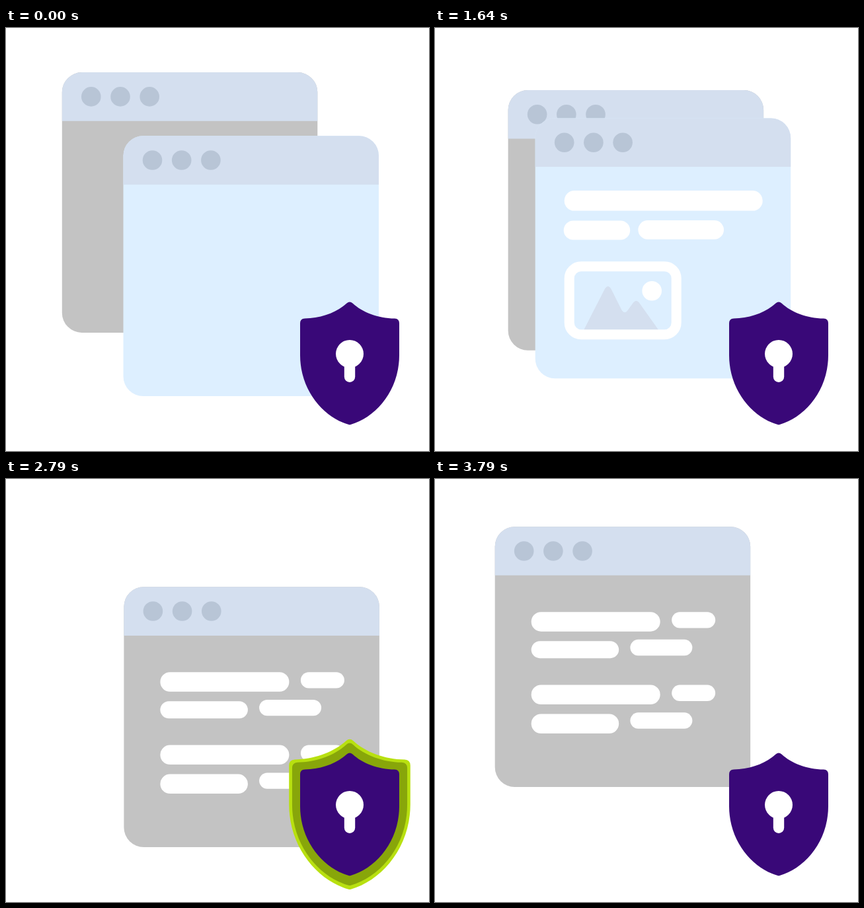
An HTML page without scripts for the animation above (3.87 s loop, 640 by 640 pixels).

```html
<!DOCTYPE html>
<html lang="en">
<head>
<meta charset="utf-8">
<title>Protected windows</title>
<style>
/* --t: milliseconds elapsed in the current half of the loop */
@property --t { syntax: '<number>'; inherits: true; initial-value: 0; }
@keyframes clock { to { --t: 1935; } }
@keyframes scene { from { visibility: visible; } 50%, to { visibility: hidden; } }

html, body { margin: 0; width: 100%; height: 100%; overflow: hidden; background: #fff; }
svg { display: block; width: 100vw; height: 100vh; animation: clock 1935ms linear -5ms infinite; }

.scene { animation: scene 3870ms step-end -5ms infinite; }
.second { animation-delay: -1940ms; }

.win {
  --p: clamp(0, (var(--t) - 1500) / 420, 1);
  --m: calc(var(--p) * var(--p) * (3 - 2 * var(--p)) * var(--dir));
  transform: translate(calc(var(--x) + 92.7px * var(--m)), calc(var(--y) + 96.2px * var(--m)));
}
.bar {
  --p: clamp(0, (var(--t) - 70 - 55 * var(--i)) / 300, 1);
  fill: #fff;
  transform-box: fill-box;
  transform-origin: left;
  transform: scaleX(calc(var(--p) * (2 - var(--p))));
}
.picture { opacity: clamp(0, (var(--t) - 150) / 300, 1); }
.border {
  fill: none; stroke: #fff; stroke-width: 15; stroke-linecap: round;
  stroke-dasharray: 1 2;
  stroke-dashoffset: calc(1.05px * (1 - clamp(0, (var(--t) - 230) / 600, 1)));
}
.ring {
  --p: clamp(0, (var(--t) - var(--start)) / 420, 1);
  --f: clamp(0, (var(--t) - var(--start) - 420) / 260, 1);
  transform-origin: 520px 507.5px;
  transform: scale(calc(1 + .427 * var(--p)));
  opacity: calc(min(1, var(--p) * 30) - var(--f) * (.4 + .6 * var(--f)));
}
.lime { fill: #b8e010; }
.olive { fill: #88a60a; }
</style>
</head>
<body>
<svg viewBox="0 0 640 640">
  <defs>
    <g id="header">
      <path d="M0 73.7V30A30 30 0 0 1 30 0H356.5A30 30 0 0 1 386.5 30V73.7Z" fill="#d4dfef"/>
      <g fill="#b8c5d6">
        <circle cx="44" cy="36.8" r="14.8"/>
        <circle cx="88.2" cy="36.8" r="14.8"/>
        <circle cx="132.4" cy="36.8" r="14.8"/>
      </g>
    </g>
    <g id="textWindow">
      <rect width="386.5" height="393.8" rx="30" fill="#c3c3c3"/>
      <use href="#header"/>
      <rect class="bar" style="--i:0" x="55" y="129" width="195" height="29.5" rx="14.7"/>
      <rect class="bar" style="--i:1" x="267.5" y="129" width="66" height="24.4" rx="12.2"/>
      <rect class="bar" style="--i:2" x="55" y="173" width="132.5" height="26" rx="13"/>
      <rect class="bar" style="--i:3" x="204.7" y="170.7" width="94" height="24.4" rx="12.2"/>
      <rect class="bar" style="--i:4" x="55" y="239.4" width="195" height="29.5" rx="14.7"/>
      <rect class="bar" style="--i:5" x="267.5" y="239.4" width="66" height="24.4" rx="12.2"/>
      <rect class="bar" style="--i:6" x="55" y="283.4" width="132.5" height="29.5" rx="14.7"/>
      <rect class="bar" style="--i:7" x="204.7" y="281.2" width="94" height="24.4" rx="12.2"/>
    </g>
    <path id="shield" d="M515.5 416.5Q520 412.5 524.5 416.5C539 430 563 439.4 588 439.6Q595 440 595 447V495C595 548 560 589 521.5 600Q520 600.4 518.5 600C480 589 445 548 445 495V447Q445 440 452 439.6C477 439.4 501 430 515.5 416.5Z"/>
  </defs>

  <g class="scene">
    <g class="win" style="--x:84.8px;--y:67.1px;--dir:1"><use href="#textWindow"/></g>
    <g class="win" style="--x:177.5px;--y:163.2px;--dir:-1">
      <rect width="386.5" height="393.8" rx="30" fill="#ddefff"/>
      <use href="#header"/>
      <rect class="bar" style="--i:0" x="44" y="109.7" width="300" height="30.5" rx="15.2"/>
      <rect class="bar" style="--i:3" x="43" y="155" width="100.5" height="29" rx="14.5"/>
      <rect class="bar" style="--i:6.4" x="155.7" y="154.6" width="129.6" height="28.8" rx="14.4"/>
      <g transform="translate(-177.5 -163.2)">
        <g class="picture">
          <path d="M251 483.5L283 421Q287.5 414 292 421L308 453Q313 461 318 453L326 442Q330 437 334.5 442L364 483.5Z" fill="#d4dfef"/>
          <circle cx="354" cy="424.5" r="14.8" fill="#fff"/>
        </g>
        <path class="border" pathLength="1" d="M248 387.5H373A18 18 0 0 1 391 405.5V472.5A18 18 0 0 1 373 490.5H247A18 18 0 0 1 229 472.5V405.5A18 18 0 0 1 247 387.5Z"/>
      </g>
    </g>
  </g>

  <g class="scene second">
    <g class="win" style="--x:178.4px;--y:163.2px;--dir:-1"><use href="#textWindow"/></g>
  </g>

  <use class="ring lime" style="--start:641" href="#shield"/>
  <use class="ring olive" style="--start:703" href="#shield"/>
  <use class="ring lime" style="--start:869" href="#shield"/>
  <use href="#shield" fill="#390878"/>
  <circle cx="520" cy="493" r="21" fill="#fff"/>
  <rect x="511.8" y="500" width="16.4" height="36" rx="8.2" fill="#fff"/>
</svg>
</body>
</html>
```
